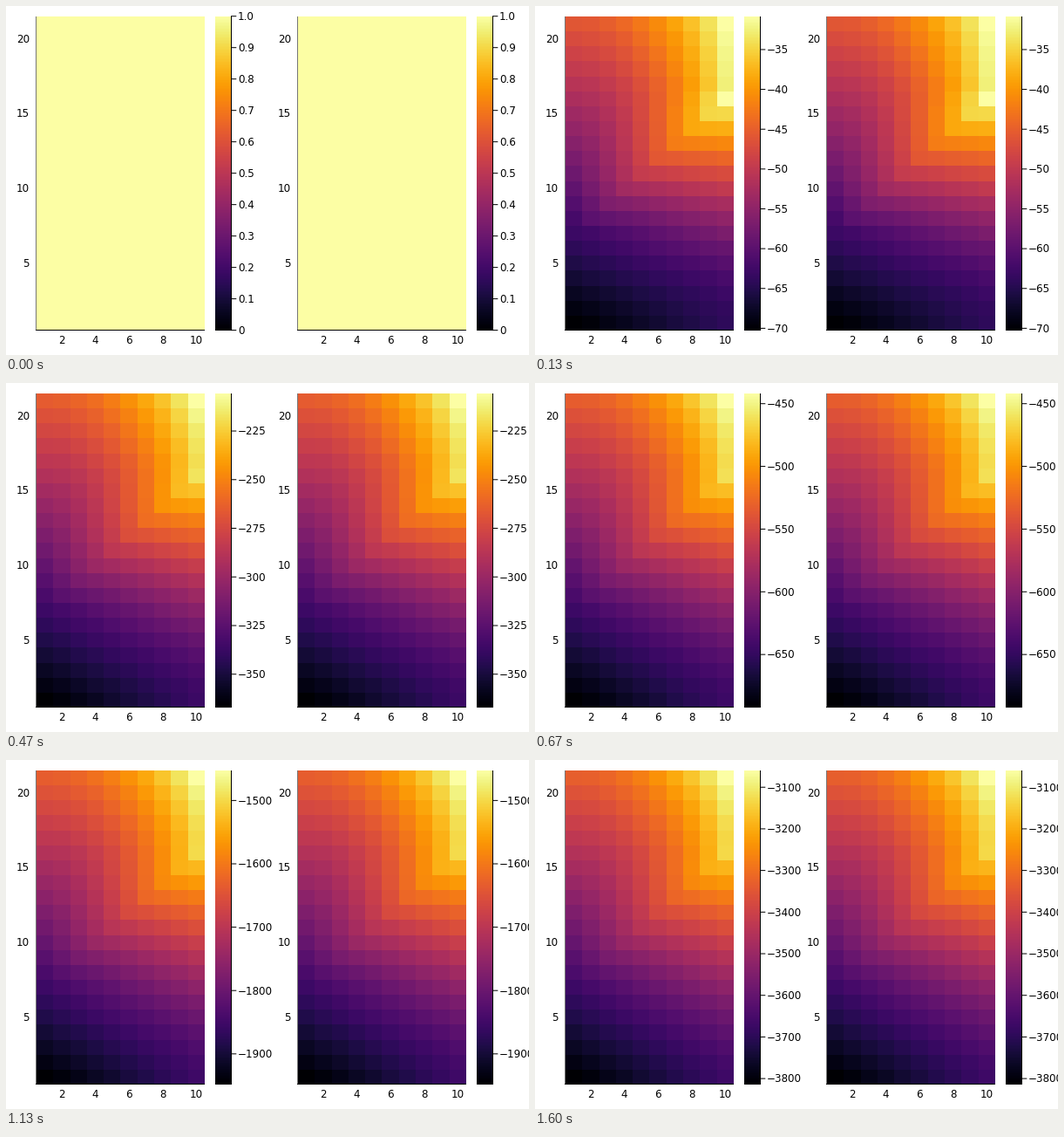
Write a matplotlib script that moves like this. It is 600 px wide and 400 px high and loops after 1670 ms.

```python
import math

import matplotlib.pyplot as plt
import numpy as np
from matplotlib.animation import FuncAnimation

LOOP_MS = 1670
TICK_MS = 10
STEPS_PER_SECOND = 15
TOP, BOTTOM = 11.7, 371.6
PANELS = (0, 300)
FONT = dict(family="DejaVu Sans", size=8.6, color="black")

# Highest value and spread over the iterations, through a few key points
KEYS = [1, 3, 10, 14, 20, 24]
PEAK = np.polyfit(KEYS, [-10.3, -52.07, -441.65, -944.1, -2063.8, -3059.1], 5)
SPAN = np.polyfit(KEYS, [16.82, 62.07, 250.4, 386.5, 606, 754.5], 5)


def mix(a, b, w):
    return a + (b - a) * w


def right_edge(y, w):
    """Climbs to the goal row 16, then eases to the top."""
    if y <= 16:
        rise = ((y - 1) / 15) ** mix(1.8, 1.4, w)
        return mix(mix(0.13, 0.20, w), mix(1, 0.89, w), rise)
    return mix(mix(0.94, 0.89, w), mix(0.95, 1, w), ((y - 16) / 5) ** 2)


def values(n):
    """21 x 10 grid in 0..1 that folds along the ridge y = x + 6."""
    if n == 0:
        return np.ones((21, 10))
    w = (n - 1) / (n + 1)
    cols = np.arange(1, 11)
    grid = np.zeros((21, 10))
    for y in range(1, 22):
        left = mix(0.57, 0.64, w) * (y - 1) / 20
        right = right_edge(y, w)
        crest = min(max(y - 6, 1), 10)
        drop = mix(0.13, 0.21, w) * ((10 - crest) / 9) ** mix(2, 1.2, w)
        ridge = right - drop if crest > 1 else left
        bend = 1 + 0.14 * min(max(y - 10, 0), 6)
        climb = np.clip((cols - 1) / max(crest - 1, 1), 0, 1) ** bend
        beyond = (cols - crest) / max(10 - crest, 1)
        grid[y - 1] = np.where(cols <= crest, mix(left, ridge, climb),
                               mix(ridge, right, beyond))
    grid -= grid.min()
    return grid / grid.max()


def multiples(low, high, step):
    first, last = math.ceil(low / step), math.floor(high / step)
    return [k * step for k in range(first, last + 1)]


def bar_ticks(n):
    """Pairs of relative height and label for the colour bar."""
    if n == 0:
        return [(k / 10, f"{k / 10:.1f}" if k else "0") for k in range(11)]
    high, span = np.polyval(PEAK, n), np.polyval(SPAN, n)
    low = high - span
    for step in (2.5, 5, 10, 25, 50, 100):
        stops = multiples(low, high, step)
        if len(stops) <= 8:
            break
    digits = 1 if step == 2.5 else 0
    return [((v - low) / span, f"\u2212{abs(v):.{digits}f}") for v in stops]


fig = plt.figure(figsize=(6, 4), dpi=100, facecolor="white")
ax = fig.add_axes([0, 0, 1, 1])
ax.axis("off")


def label(x, y, text, align):
    return ax.text(x, y + 4.3, text, ha=align, va="baseline", **FONT)


def line(xs, ys, color="black"):
    return ax.plot(xs, ys, color=color, lw=0.72, snap=False,
                   solid_capstyle="butt")[0]


def picture(data, x0, x1):
    return ax.imshow(data, cmap="inferno", vmin=0, vmax=1, origin="lower",
                     extent=(x0, x1, 372, 12), aspect="auto",
                     interpolation="nearest")


maps = []
for dx in PANELS:
    maps.append(picture(values(0), dx + 35, dx + 228))
    picture(np.linspace(0, 1, 256)[:, None], dx + 240, dx + 258)
    line([dx + 34.5] * 2, [12, 372], "#777777")
    line([dx + 34, dx + 228], [371.5] * 2)
    line([dx + 258.5] * 2, [12, 372])
    for x in range(2, 11, 2):
        label(dx + 35.1 + (x - 0.5) * 19.26, 382.8, str(x), "center")
    for y in range(5, 21, 5):
        label(dx + 27, BOTTOM - (y - 0.5) * 360 / 21, str(y), "right")

ax.set_xlim(0, 600)
ax.set_ylim(400, 0)
marks = []


def draw(tick):
    n = int((tick * TICK_MS + TICK_MS / 2) * STEPS_PER_SECOND / 1000)
    while marks:
        marks.pop().remove()
    grid = values(n)
    for image in maps:
        image.set_data(grid)
    for height, text in bar_ticks(n):
        y = mix(BOTTOM, TOP, height)
        for dx in PANELS:
            marks.append(line([dx + 258, dx + 264.3], [y, y]))
            marks.append(label(dx + 266, y, text, "left"))
    return maps + marks


anim = FuncAnimation(fig, draw, frames=LOOP_MS // TICK_MS,
                     init_func=lambda: draw(0), interval=TICK_MS,
                     repeat=True, repeat_delay=0)
plt.show()
```
